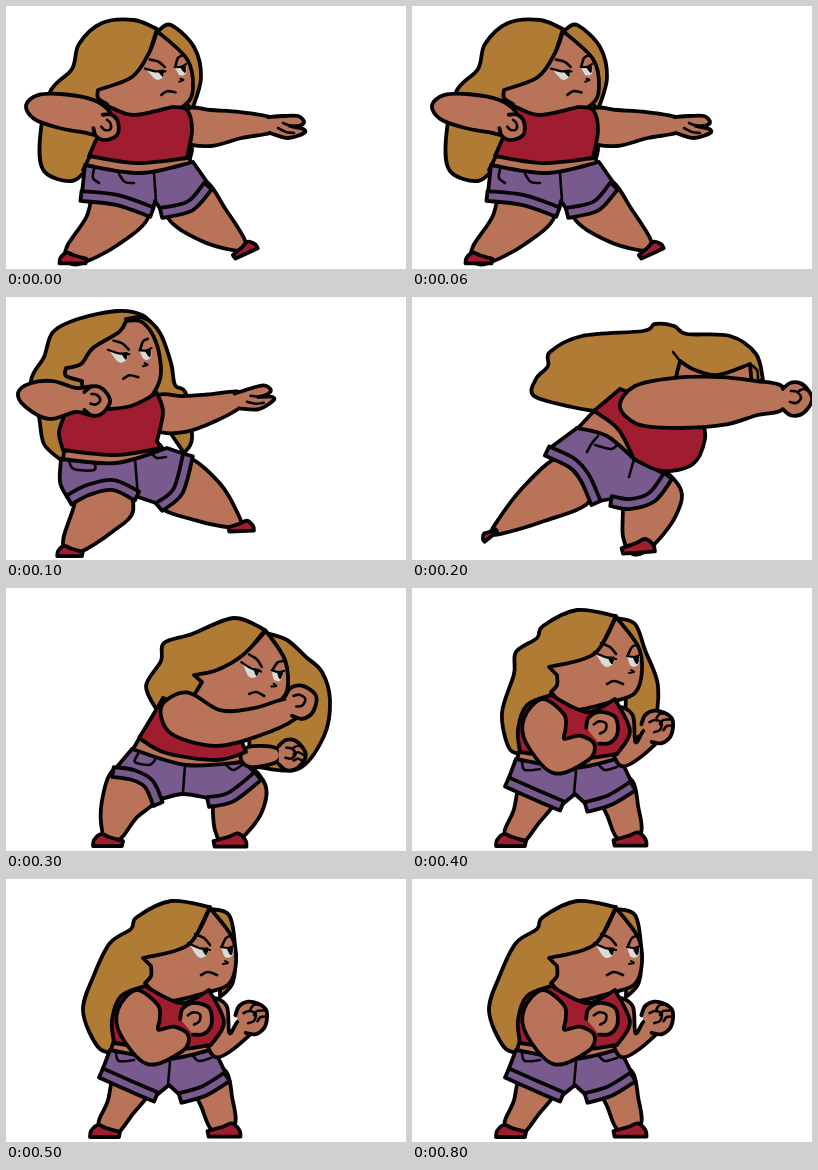
These frames come from a looping animation (400x263 px, 1 s). An HTML page:

```html
<!DOCTYPE html>
<html lang="en">
<head>
<meta charset="utf-8">
<title>Punch</title>
<style>
html, body { margin: 0; width: 100%; height: 100%; overflow: hidden; background: #fff; }
svg { display: block; width: 100%; height: 100%; }
path { stroke: #050304; stroke-linejoin: round; stroke-linecap: round; vector-effect: non-scaling-stroke; }
</style>
</head>
<body>
<svg id="stage" viewBox="0 0 400 263"></svg>
<script>
const skin = '#b87358', hair = '#b07b34', red = '#a01c2f', denim = '#785a8e', white = '#d9dcd6', black = '#050304';
const stage = document.getElementById('stage');
let layer = stage;

function add(tag, attrs) {
  const node = document.createElementNS('http://www.w3.org/2000/svg', tag);
  for (const name in attrs) node.setAttribute(name, attrs[name]);
  layer.append(node);
  return node;
}

function group(attrs, draw) {
  const outer = layer;
  const node = layer = add('g', attrs);
  draw();
  layer = outer;
  return node;
}

const place = (x, y, turn, size, draw, flip = 1) =>
  group({ transform: `translate(${x} ${y}) rotate(${turn}) scale(${size * flip} ${size})` }, draw);

const parse = text => text.trim().split(/\s+/).map(p => p.split(',').map(Number));

// Catmull-Rom curve through the points, as cubic segments.
function curve(pts, loop) {
  const n = pts.length;
  const at = i => loop ? pts[(i + n) % n] : pts[Math.max(0, Math.min(n - 1, i))];
  let d = '';
  for (let i = 0; i < (loop ? n : n - 1); i++) {
    const [a, b, c, e] = [at(i - 1), at(i), at(i + 1), at(i + 2)];
    const c1 = b.map((v, k) => v + (c[k] - a[k]) / 6);
    const c2 = c.map((v, k) => v - (e[k] - b[k]) / 6);
    d += `C${c1} ${c2} ${c}`;
  }
  return d;
}

// Runs are smooth; they meet in corners.
const trace = runs => 'M' + runs[0][0] +
  runs.map((run, i) => curve(i ? [runs[i - 1].at(-1), ...run] : run)).join('');

const ink = (d, fill, width = 3.8) => add('path', { d, fill, 'stroke-width': width });
const shape = (fill, text, width) => ink(trace(text.split('/').map(parse)), fill, width);
const line = (text, width = 2.6) => shape('none', text, width);

// A limb through x,y,radius keys; cap 0 gives square ends.
function tube(fill, text, cap = 0.85) {
  const keys = parse(text), last = keys.length - 1;
  const dirs = keys.map((_, i) => {
    const a = keys[Math.max(0, i - 1)], b = keys[Math.min(last, i + 1)];
    const len = Math.hypot(b[0] - a[0], b[1] - a[1]);
    return [(b[0] - a[0]) / len, (b[1] - a[1]) / len];
  });
  const off = (i, along, across) => {
    const [x, y, r] = keys[i], [dx, dy] = dirs[i];
    return [x + r * (dx * along - dy * across), y + r * (dy * along + dx * across)];
  };
  const left = keys.map((_, i) => off(i, 0, -1));
  const right = keys.map((_, i) => off(i, 0, 1)).reverse();
  if (!cap) ink(trace([left, [right[0]], right.slice(1), [left[0]]]), fill);
  else ink('M' + left[0] + curve([...left, off(last, cap, 0), ...right, off(0, -cap, 0)], true), fill);
}

function leg(keys, x, y, turn, size, flip) {
  tube(skin, keys);
  place(x, y, turn, size, () => shape(red, '-15,6 / -14,0 -7,-6 1,-3 15,1 / 14,6 / -15,6'), flip);
}

function shorts(outline, cuffs, seams) {
  shape(denim, outline);
  for (const cuff of cuffs) tube(denim, cuff.replace(/(\S+)/g, '$1,5'), 0);
  seams.forEach(seam => line(seam));
}

// The wrist is the open side, on the left before turning.
function fist(x, y, turn, size, fingers = 0) {
  place(x, y, turn, size, () => {
    const pts = [];
    for (let a = -140; a <= 140; a += 35) {
      const t = a * Math.PI / 180, r = 16.5 + 0.7 * Math.cos(4 * t);
      pts.push([r * Math.cos(t), r * Math.sin(t)]);
    }
    ink(trace([pts]), skin);
    line('-4,-8 2,-7 6,-1 1,4 -5,3');
    for (let i = 0; i < fingers; i++) line(`4,${7 * i - 8} 9,${7 * i - 10} 15,${7 * i - 7}`);
  });
}

function openHand(x, y, turn) {
  place(x, y, turn, 1, () => {
    shape(skin, '-18,-8 -3,-9 12,-9 18,-3 13,1 4,1 / 17,4 18,8 2,13 -16,8');
    line('-3,-2 6,1 16,0');
    line('-8,3 0,7 8,8');
  });
}

function face(x, y, turn, size = 1) {
  place(x, y, turn, size, () => {
    shape(white, '-24,-6 -14,-1 -4,1 / -7,7 -15,8 -24,-6', 0);
    shape(white, '8,-2 15,-1 21,-3 / 19,7 12,8 8,-2', 0);
    for (const px of [-8, 17]) shape(black, `${px - 3},-1 ${px + 3},-1 / ${px + 1},6 ${px - 3},-1`, 1);
    line('-25,-6 -14,-1 -3,1', 2.2);
    line('8,-2 15,-1 21,-3', 2.2);
    line('-18,-15 -9,-11 -3,-4');
    line('9,-3 13,-11 18,-13');
    line('12,12 15,14 10,15', 2);
    line('-12,26 -5,23 4,26');
  });
}

function windup() {
  shape(hair, '151,23 128,14 96,17 73,38 66,63 44,86 34,132 38,165 66,175 84,160 / 130,90 / 151,23');
  shape(hair, '152,25 165,19 188,41 195,72 186,104 / 165,80 / 152,25');
  shape(hair, '179,138 186,142 183,156');
  leg('118,193,30 96,225,21 68,249,11', 67, 252, 0, 0.9);
  leg('180,193,26 207,219,20 233,238,8', 238, 243, -25, 0.85, -1);
  shape(skin, '84,150 / 77,164 / 130,175 187,160 / 182,150');
  shorts('79,159 / 76,187 / 111,190 147,203 / 149,195 / 155,204 / 185,196 201,176 / 187,156 / 135,167 79,159',
    ['75,190 111,194 146,206', '155,207 184,200 202,180'],
    ['148,167 150,195', '88,163 87,172 93,177', '113,168 119,176 128,177']);
  tube(skin, '180,119,17 205,122,18 235,119,13 264,119,8');
  openHand(280, 119, 0);
  shape(skin, '151,25 143,47 126,71 92,84 / 92,92 101,98 / 112,113 150,113 / 179,99 187,82 181,53 151,25');
  face(162, 64, -10, 0.9);
  shape(red, '104,101 / 128,109 166,101 / 181,104 186,124 181,152 / 130,157 83,150 / 90,134 104,101');
  tube(skin, '30,101,12 55,105,17 82,110,17 98,117,13');
  fist(100, 121, 35, 0.8);
}

function ready() {
  shape(hair, '150,31 136,18 112,14 72,22 47,35 38,60 25,84 33,120 38,147 55,163 / 90,140 / 150,31');
  shape(hair, '120,22 138,21 154,36 165,66 169,88 180,97 186,141 178,156 / 140,100 / 120,22');
  leg('100,198,31 87,222,23 66,248,11', 64, 254, 0, 0.85);
  leg('166,184,28 202,205,22 229,225,7', 235, 229, -2, 0.85, -1);
  shape(skin, '59,150 / 56,167 / 110,174 160,156 / 154,148');
  shorts('55,162 54,185 61,200 / 82,190 107,185 131,197 / 132,200 / 153,207 / 170,196 181,158 / 161,151 / 110,166 55,162',
    ['63,203 82,193 107,188 131,199', '153,210 172,194 182,158'],
    ['129,162 132,200', '63,164 68,172 88,173 88,165', '146,157 151,161 160,160']);
  tube(skin, '152,116,18 178,117,18 205,111,14 233,102,8');
  openHand(248, 100, -14);
  shape(skin, '120,24 113,35 87,51 75,67 60,71 / 60,79 76,84 / 80,100 108,114 132,110 / 147,97 155,76 150,45 136,25 120,24');
  face(126, 56, -6, 0.95);
  shape(red, '72,112 / 90,113 125,109 151,96 / 157,115 151,144 / 155,151 / 110,158 57,153 / 53,135 60,115');
  tube(skin, '22,98,12 45,103,19 70,103,12 88,104,14');
  fist(89, 104, 0, 0.88);
}

function punch() {
  shape(hair, '182,114 160,110 122,99 124,82 136,69 138,55 170,39 231,34 243,27 262,29 275,37 318,39 344,57 351,83 / 260,105 / 182,114');
  leg('163,182,27 122,207,20 85,233,5', 77, 237, -38, 0.55);
  leg('236,192,32 237,214,27 225,245,15', 226, 249, -4, 1.1, -1);
  shape(skin, '183,113 / 166,131 / 222,163 / 208,128');
  shorts('165,131 138,151 / 160,164 172,180 187,204 / 199,202 / 218,205 239,198 253,177 / 222,162 / 195,139 165,131',
    ['135,154 160,166 173,181 184,206', '199,204 218,207 240,200 256,179'],
    ['222,162 217,180', '186,139 180,146 175,155', '183,148 199,152 206,147']);
  shape(red, '208,92 182,114 / 206,132 222,162 / 250,174 281,167 293,142 290,122 / 208,92');
  shape(skin, '268,64 283,73 306,78 338,67 / 340,90 / 263,84 / 268,64');
  line('261,55 268,64');
  line('338,67 345,73 346,81');
  tube(skin, '224,108,19 262,106,25 310,104,24 345,101,17 368,101,13');
  fist(383, 102, 0, 1, 1);
}

function recoil() {
  shape(hair, '259,42 228,30 186,46 158,55 155,73 140,98 152,124 / 190,130 / 259,42');
  shape(hair, '260,45 281,52 300,69 316,84 324,112 318,148 292,181 245,178 / 240,110 / 260,45');
  leg('130,195,26 113,222,19 106,247,10', 102, 252, 0, 1);
  leg('232,195,27 231,220,25 222,246,14', 224, 252, 0, 1.1, -1);
  shape(skin, '134,149 / 126,163 / 180,182 238,174 / 234,160');
  shorts('126,161 110,180 / 127,184 145,195 155,211 / 177,206 202,210 / 225,206 251,186 / 237,174 / 180,177 126,161',
    ['107,184 127,187 143,196 152,216', '202,214 225,209 252,188'],
    ['179,177 177,204', '132,166 129,174 143,177 149,172', '219,176 227,182 236,177']);
  tube(skin, '243,169,10 268,167,8');
  fist(284, 167, 0, 0.92, 3);
  shape(skin, '260,43 237,67 211,82 188,87 / 196,94 / 187,109 / 225,130 267,119 / 281,103 279,72 260,43');
  face(258, 83, 8, 0.95);
  shape(red, '157,110 147,127 133,150 / 160,165 210,172 240,164 / 230,140 / 157,110');
  tube(skin, '173,125,22 212,140,18 250,134,14 285,121,11');
  fist(294, 114, -20, 1);
}

function guard(backHair, sideHair) {
  shape(hair, '204,28 165,22 131,38 125,50 104,64 ' + backHair + ' / 160,120 / 204,28');
  shape(hair, '204,30 223,36 ' + sideHair + ' / 214,100 / 204,30');
  leg('128,200,20 114,229,14 102,249,11', 99, 252, 0, 1);
  leg('203,198,18 211,224,16 217,246,13', 218, 251, 0, 1.1, -1);
  shape(skin, '108,161 / 104,174 / 160,184 208,174 / 207,160');
  shorts('104,171 96,192 / 122,203 152,215 / 163,206 / 174,216 / 198,209 220,195 / 208,170 / 160,180 104,171',
    ['95,194 122,206 150,218', '174,219 198,212 221,198'],
    ['164,183 162,206', '110,174 113,182 128,181', '187,177 193,182 205,179']);
  tube(skin, '208,130,13 216,166,14 238,149,9');
  fist(245, 139, -30, 1, 3);
  shape(skin, '204,29 182,66 137,79 / 145,87 / 145,97 139,104 / 160,122 203,113 / 223,105 230,83 226,58 204,29');
  face(207, 70, 0);
  shape(red, '139,107 115,117 106,141 108,164 / 160,171 205,166 / 218,143 203,111 / 175,124 139,107');
  tube(skin, '132,128,20 134,148,21 147,168,18 172,160,13');
  fist(190, 140, -40, 1);
}

const poses = [
  windup, ready, punch, recoil,
  () => guard('102,86 90,125 97,160 110,166', '233,62 246,98 240,139 213,154'),
  () => guard('88,96 77,132 92,168 109,174', '229,68 227,103 214,118')
].map(draw => group({}, draw));

const step = 100, loop = 1000;
const start = performance.now();
function draw() {
  const time = (performance.now() - start) % loop;
  const current = Math.min(poses.length - 1, Math.floor(time / step));
  poses.forEach((pose, i) => pose.setAttribute('display', i === current ? 'inline' : 'none'));
  requestAnimationFrame(draw);
}
draw();
</script>
</body>
</html>
```
